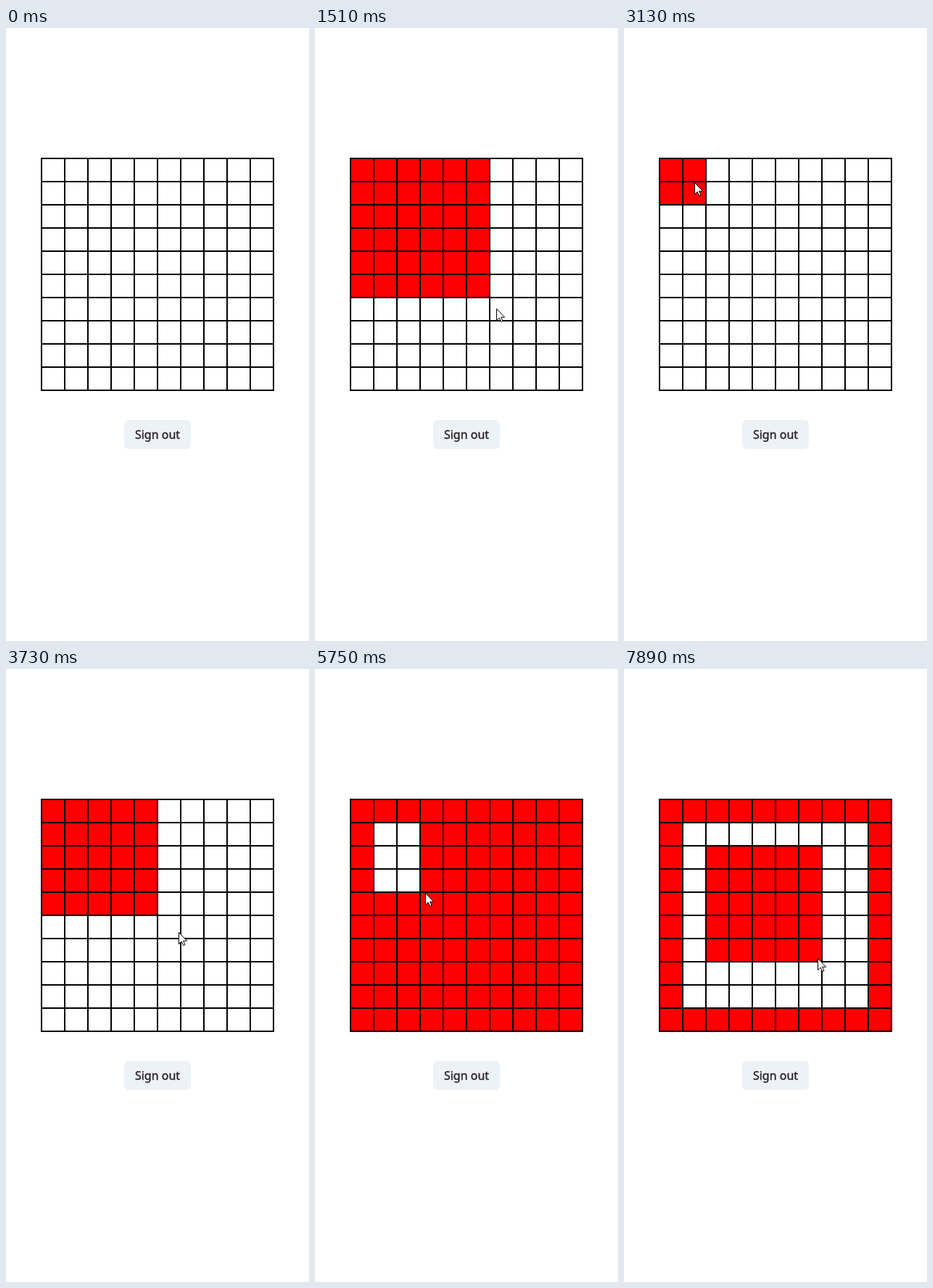
An HTML page that plays this animation: 418 px wide and 846 px high, repeating every 7990 ms.

```html
<!DOCTYPE html>
<html lang="en">
<head>
<meta charset="utf-8">
<title>Grid painter</title>
<style>
  html, body { margin: 0; width: 100%; height: 100%; overflow: hidden; background: #fff; }
  svg { display: block; }
  text {
    font: 16px "Noto Sans", "Open Sans", sans-serif;
    fill: #2a2229; stroke: #2a2229; stroke-width: .35px; text-anchor: middle;
  }
</style>
</head>
<body>
<svg width="418" height="846" viewBox="0 0 418 846">
  <g id="fills"></g>
  <path id="grid" fill="none" stroke="#000" stroke-width="2"/>
  <rect x="163" y="541" width="92" height="40" rx="6" fill="#edf2f7"/>
  <text x="209" y="567">Sign out</text>
  <g id="pointer">
    <path d="M.5 .5V16.6L4.2 13.1L6.7 18.5L9 17.5L6.6 12.2H11.6Z" fill="#fff" stroke="#000"/>
    <circle id="press" r="12" fill="#ff0" fill-opacity=".5"/>
  </g>
</svg>
<script>
const LOOP = 7990, X0 = 49, Y0 = 180, CELL = 32, COUNT = 10, LAG = 70;

// Places where the pointer turns, stops or changes pace
const keys = [
  { t: 90, x: 378, y: 834 },
  { t: 600, x: 45, y: 200 },
  { t: 710, x: 61, y: 192 },
  { t: 910, x: 61, y: 192 },
  { t: 1510, x: 250, y: 387 },
  { t: 1970, x: 324, y: 456 },
  { t: 2210, x: 291, y: 436 },
  { t: 3130, x: 97, y: 213 },
  { t: 3230, x: 85, y: 200 },
  { t: 4030, x: 324, y: 456 },
  { t: 4450, x: 347, y: 482 },
  { t: 4650, x: 347, y: 482 },
  { t: 5350, x: 98, y: 230 },
  { t: 5450, x: 98, y: 230 },
  { t: 6170, x: 296, y: 448 },
  { t: 6270, x: 326, y: 450 },
  { t: 6570, x: 326, y: 450 },
  { t: 7270, x: 128, y: 260 },
  { t: 7890, x: 267, y: 399 }
];

// Two clicks bound each area; every area grows from a diagonal cell
const areas = [
  { from: 910, to: 4650, cell: 0, color: "#f00" },
  { from: 5450, to: 6570, cell: 1, color: "#fff" },
  { from: 7270, to: LOOP, cell: 2, color: "#f00" }
];
const clicks = areas.flatMap(a => [a.from, a.to]);

const $ = id => document.getElementById(id);

// The picture steps every 100 ms, with 20 ms more on each 18th step
const stepStart = n => 100 * n + 20 * Math.floor((n + 13) / 18) - 10;

function snap(t) {
  const n = Math.floor(t / 100);
  return stepStart(stepStart(n) > t ? n - 1 : n);
}

function pace(i, axis) {
  const a = keys[i - 1], b = keys[i], c = keys[i + 1];
  if (!a || !c) return 0;
  const before = (b[axis] - a[axis]) / (b.t - a.t);
  const after = (c[axis] - b[axis]) / (c.t - b.t);
  return before * after > 0 ? 2 * before * after / (before + after) : 0;
}

// Monotone cubic curve through the keys
function at(t, axis) {
  const i = keys.findIndex(k => k.t > t);
  if (i <= 0) return keys.at(i)[axis];
  const a = keys[i - 1], b = keys[i], span = b.t - a.t;
  const u = (t - a.t) / span, v = 1 - u;
  return a[axis] + (b[axis] - a[axis]) * u * u * (3 - 2 * u)
    + span * u * v * (v * pace(i - 1, axis) - u * pace(i, axis));
}

function build() {
  const size = CELL * COUNT;
  let d = "";
  for (let i = 0; i <= COUNT; i++) {
    const p = i * CELL;
    d += `M${X0 - 1} ${Y0 + p}h${size + 2}M${X0 + p} ${Y0 - 1}v${size + 2}`;
  }
  $("grid").setAttribute("d", d);
  for (const a of areas) {
    a.rect = document.createElementNS("http://www.w3.org/2000/svg", "rect");
    a.rect.setAttribute("x", X0 + a.cell * CELL);
    a.rect.setAttribute("y", Y0 + a.cell * CELL);
    a.rect.setAttribute("fill", a.color);
    $("fills").append(a.rect);
  }
}

function extent(pos, origin, cell) {
  const last = Math.min(COUNT - 1, Math.max(cell, Math.floor((pos - origin) / CELL)));
  return (last - cell + 1) * CELL;
}

function show(el, on) {
  el.style.display = on ? "" : "none";
}

function draw(now) {
  const t = snap(now % LOOP);
  for (const a of areas) {
    const seen = Math.min(a.to, Math.max(a.from, t - LAG));
    show(a.rect, t >= a.from);
    a.rect.setAttribute("width", extent(at(seen, "x"), X0, a.cell));
    a.rect.setAttribute("height", extent(at(seen, "y"), Y0, a.cell));
  }
  const x = Math.round(at(t, "x")), y = Math.round(at(t, "y"));
  $("pointer").setAttribute("transform", `translate(${x} ${y})`);
  show($("pointer"), t >= keys[0].t);
  show($("press"), clicks.some(c => t >= c && t < c + 100));
}

build();
const begin = performance.now();
function tick() {
  draw(performance.now() - begin);
  requestAnimationFrame(tick);
}
tick();
</script>
</body>
</html>
```
